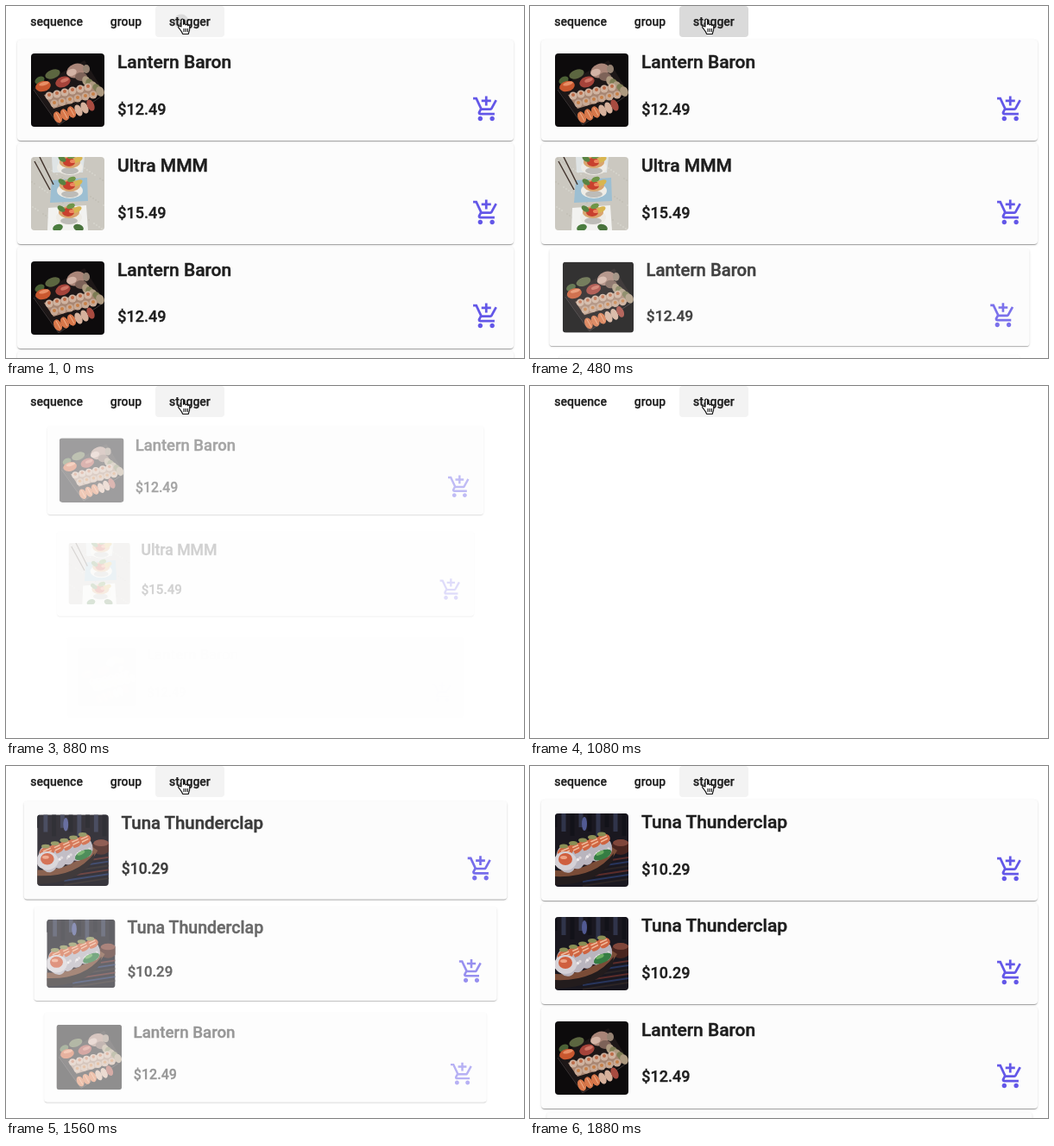
An HTML page that plays this animation: 600x408 px, repeating every 1.92 s.

```html
<!DOCTYPE html>
<html lang="en">
<head>
<meta charset="utf-8">
<title>Staggered menu</title>
<style>
  html, body { margin: 0; width: 100%; height: 100%; overflow: hidden; background: #fff; }
  #stage { position: relative; width: 600px; height: 100%; max-height: 408px; overflow: hidden; contain: strict; }
  svg { position: absolute; left: 0; top: 0; }
  text { font: 500 14px Roboto, Arial, sans-serif; fill: #1e1e1e; stroke: #1e1e1e; stroke-width: .25px; }
  .title { font-size: 21px; stroke-width: .45px; }
  .price { font-size: 18px; stroke-width: .35px; }
  .card {
    position: absolute; left: 13px; width: 575px; height: 117.4px;
    border-radius: 4px; background: #fcfcfc;
    box-shadow: 0 2px 1px -1px rgba(0,0,0,.2), 0 1px 1px rgba(0,0,0,.14), 0 1px 3px rgba(0,0,0,.12);
  }
  .upper { top: 16.4px; }
  .lower { top: 64px; }
</style>
</head>
<body>
<div id="stage">
<svg width="0" height="0">
  <defs>
    <clipPath id="frame"><rect width="85" height="85" rx="4"/></clipPath>
    <clipPath id="button"><rect x="173" width="80" height="36" rx="4"/></clipPath>
    <path id="cart" fill="#6357e8" d="M11 9h2V6h3V4h-3V1h-2v3H8v2h3v3zm-4 9c-1.1 0-2 .9-2 2s.9 2 2 2 2-.9 2-2-.9-2-2-2zm10 0c-1.1 0-2 .9-2 2s.9 2 2 2 2-.9 2-2-.9-2-2-2zm-9.8-3.3v-.1L8.1 13h7.45c.75 0 1.41-.41 1.75-1.03l3.86-7.01L19.42 4l-1.11 2-2.76 5H8.53L4.27 2H1v2h2l3.6 7.59-1.35 2.45c-.16.28-.25.61-.25.96 0 1.1.9 2 2 2h12v-2H7.42c-.13 0-.22-.1-.22-.3z"/>
    <g id="box"></g>
    <g id="bowls"></g>
    <g id="rolls"></g>
  </defs>
</svg>

<svg width="600" height="38">
  <g clip-path="url(#button)">
    <rect x="173" width="80" height="36" fill="#f3f3f3"/>
    <circle id="ripple" cx="203" cy="18"/>
  </g>
  <text x="28.3" y="23">sequence</text>
  <text x="120.8" y="23">group</text>
  <text x="189" y="23">stagger</text>
  <path transform="translate(198 13.5)" fill="#fff" stroke="#111" stroke-width="1.1" stroke-linejoin="round"
    d="M5 10.5V3c0-2 2.6-2 2.6 0v5c.3-1.3 2.4-1 2.5.4.6-1 2.3-.7 2.4.7.7-.8 2.2-.3 2.2 1v3.5c0 2-1.2 3-1.4 5.4H6.6C6.2 16.5 3.8 14 2 11.6 1 10 2.6 8.8 5 10.5zM8 12.5v4m2.2-4v4m2.2-4v4"/>
</svg>
</div>

<script>
const LOOP = 1920, STEP = 40, SWAP = 1100;
const $ = id => document.getElementById(id);
const clamp = v => Math.min(1, Math.max(0, v));
const easeOut = v => 1 - (1 - clamp(v)) ** 3;

// Small helpers for the painted dishes
const blob = (x, y, rx, ry, fill, turn = 0) =>
  `<ellipse cx="${x}" cy="${y}" rx="${rx}" ry="${ry}" fill="${fill}" transform="rotate(${turn} ${x} ${y})"/>`;
const shape = (d, fill) => `<path d="${d}" fill="${fill}"/>`;
const line = (d, color, width) => `<path d="${d}" fill="none" stroke="${color}" stroke-width="${width}"/>`;
const row = (n, draw) => Array.from({ length: n }, (_, i) => draw(i)).join('');

$('box').innerHTML =
  shape('M0 0H85V85H0z', '#0d0b0c') +
  shape('M3 40L62 8L84 44L32 83z', '#1d1717') +
  line('M3 42L32 83L84 48', '#3c3535', 1) +
  blob(25, 24, 9, 5, '#5c6640', -20) + blob(10, 31, 6, 4, '#4c6136', -30) +
  blob(52, 20, 11, 8, '#a98578', -20) + blob(47, 22, 6, 4, '#d3b3a5', -20) +
  blob(58, 27, 7, 5, '#7d6258') + blob(64, 18, 4, 5, '#958272') +
  blob(14, 38, 9, 6, '#c9582f', -15) + blob(15, 35, 6, 2, '#e88f66', -15) +
  blob(37, 33, 9, 6, '#a5433a', -20) + blob(39, 31, 5, 2, '#cf7565', -20) +
  row(5, i => blob(64 + i * 4, 32 + i * 3, 4.5, 6, i % 2 ? '#7e7d55' : '#ad9a80', -25)) +
  shape('M15 48L68 36L78 48L26 64z', '#a88672') +
  row(6, i => blob(21 + i * 9, 49 - i * 2, 4.5, 4.5, '#cfb3a0') + blob(21 + i * 9, 48 - i * 2, 2, 2, '#bd6c48')) +
  row(6, i => blob(27 + i * 9, 58 - i * 2, 4.5, 4.5, '#c7a995') + blob(27 + i * 9, 57 - i * 2, 2, 2, '#c78048')) +
  row(3, i => blob(31 + i * 8, 74 - i * 3, 4.5, 7, '#d8774a', -25) + line(`M${29 + i * 8} ${69 - i * 3}l5 9`, '#eeb08a', 1)) +
  row(3, i => blob(55 + i * 7, 66 - i * 3, 4, 7, i < 2 ? '#d6b19c' : '#a84b40', -25));

const bowl = (x, y) =>
  blob(x, y + 6, 15, 9, '#eeece6') + blob(x, y + 10, 10, 4, '#bdbcb8') +
  blob(x, y, 12, 7, '#d9a46d') + blob(x - 1, y, 7, 5, '#c8402e') +
  blob(x - 9, y - 4, 5, 3, '#598342', 35) + blob(x + 9, y - 3, 6, 3, '#d8b550', -25) +
  blob(x + 2, y - 7, 5, 3, '#6f9648', -20) + blob(x + 3, y - 1, 3, 2, '#ee8760');

$('bowls').innerHTML =
  shape('M0 0H85V85H0z', '#cbc8c0') +
  row(70, i => blob(i * 37 % 85, i * 53 % 85, .8, .8, i % 2 ? '#bab6ad' : '#dcdad4')) +
  shape('M24 0H62L60 18H25z', '#dfe4e5') +
  shape('M24 27L65 24L66 51L22 53z', '#9dbfd2') +
  shape('M20 59L64 56L66 85H19z', '#f2f2f0') +
  line('M4 5L22 38M10 0L26 32', '#44362f', 1.5) +
  bowl(45, 6) + bowl(45, 33) + bowl(44, 64) +
  blob(31, 82, 6, 4, '#4b7d3f', -20) + blob(55, 82, 6, 4, '#49733c', 20);

$('rolls').innerHTML =
  shape('M0 0H85V85H0z', '#1a1820') +
  row(9, i => line(`M${i * 10} 0V${16 + i % 3 * 5}`, i % 2 ? '#30344a' : '#121219', 5)) +
  blob(34, 12, 3, 8, '#515a92') +
  row(6, i => line(`M32 ${84 - i * 5}L85 ${76 - i * 5}`, ['#2b2425', '#28355c', '#5a2c2a'][i % 3], 2)) +
  blob(76, 39, 11, 9, '#49251f') + blob(76, 34, 9, 4, '#80463a') +
  shape('M0 66Q42 68 66 39L72 43Q55 76 0 76z', '#7a4c37') +
  shape('M0 73Q46 75 68 46L67 55Q48 82 0 83z', '#231c1d') +
  row(5, i => {
    const x = 57 - i * 11, y = 35 + i * 3.5;
    return blob(x, y + 4, 9 + i * .6, 12 + i, '#b9b5be', -12) +
      blob(x - 1, y - 5, 8 + i * .4, 6, '#cf6440', -20) +
      line(`M${x - 6} ${y - 5}l9-4m-7 7l8-4`, '#efb899', 1.5) +
      blob(x - 3, y - 11, 5, 2.5, '#8a8f55') +
      row(5, j => blob(x - 5 + j * 2.5, y + 5 + j * 7 % 9, 1.7, 1.7, j % 2 ? '#f0ecec' : '#dcd6da'));
  }) +
  blob(12, 55, 13, 11, '#d5d1d6') + blob(12, 53, 8, 7, '#cf5f3f') + blob(10, 51, 4, 2, '#eda284') +
  blob(55, 48, 11, 5, '#357d43', -25) + blob(52, 46, 5, 2, '#6cae62', -25);

const baron = ['Lantern Baron', '$12.49', 'box'];
const ultra = ['Ultra MMM', '$15.49', 'bowls'];
const tuna = ['Tuna Thunderclap', '$10.29', 'rolls'];
const menus = [[baron, ultra, baron, ultra], [tuna, tuna, baron, ultra]];

const cards = menus[0].map((_, i) => {
  const card = document.createElement('div');
  card.className = 'card';
  card.style.top = 38.6 + 120.4 * i + 'px';
  $('stage').append(card);
  return card;
});

function fill(menu) {
  menu.forEach(([title, price, photo], i) => cards[i].innerHTML = `
    <svg class="upper" width="575" height="85">
      <g transform="translate(16)"><use href="#${photo}" clip-path="url(#frame)"/></g>
      <text class="title" x="116" y="17.2">${title}</text>
    </svg>
    <svg class="lower" width="575" height="40">
      <text class="price" x="116.3" y="23">${price}</text>
      <use href="#cart" transform="translate(526.7) scale(1.38)"/>
    </svg>`);
}

// Cards leave from the bottom up and return from the top down
const hidden = (i, t) => t < SWAP
  ? clamp((t - 590 + 94 * i) / 480)
  : 1 - clamp((t - 1126 - 102.5 * i) / 500);

let shown;
function draw(now) {
  const t = Math.floor(now % LOOP / STEP) * STEP;
  const menu = menus[+(t >= SWAP)];
  if (menu !== shown) fill(shown = menu);
  cards.forEach((card, i) => {
    const p = hidden(i, t);
    card.style.opacity = 1 - p;
    card.style.transform = p ? `scale(${1 - .2 * p})` : 'none';
  });
  $('ripple').setAttribute('r', 54 * easeOut((t + 25) / 450));
  $('ripple').setAttribute('opacity', .1 * (1 - easeOut((t - 480) / 400)));
}

const start = performance.now();
function tick() {
  draw(performance.now() - start);
  requestAnimationFrame(tick);
}
tick();
</script>
</body>
</html>
```
